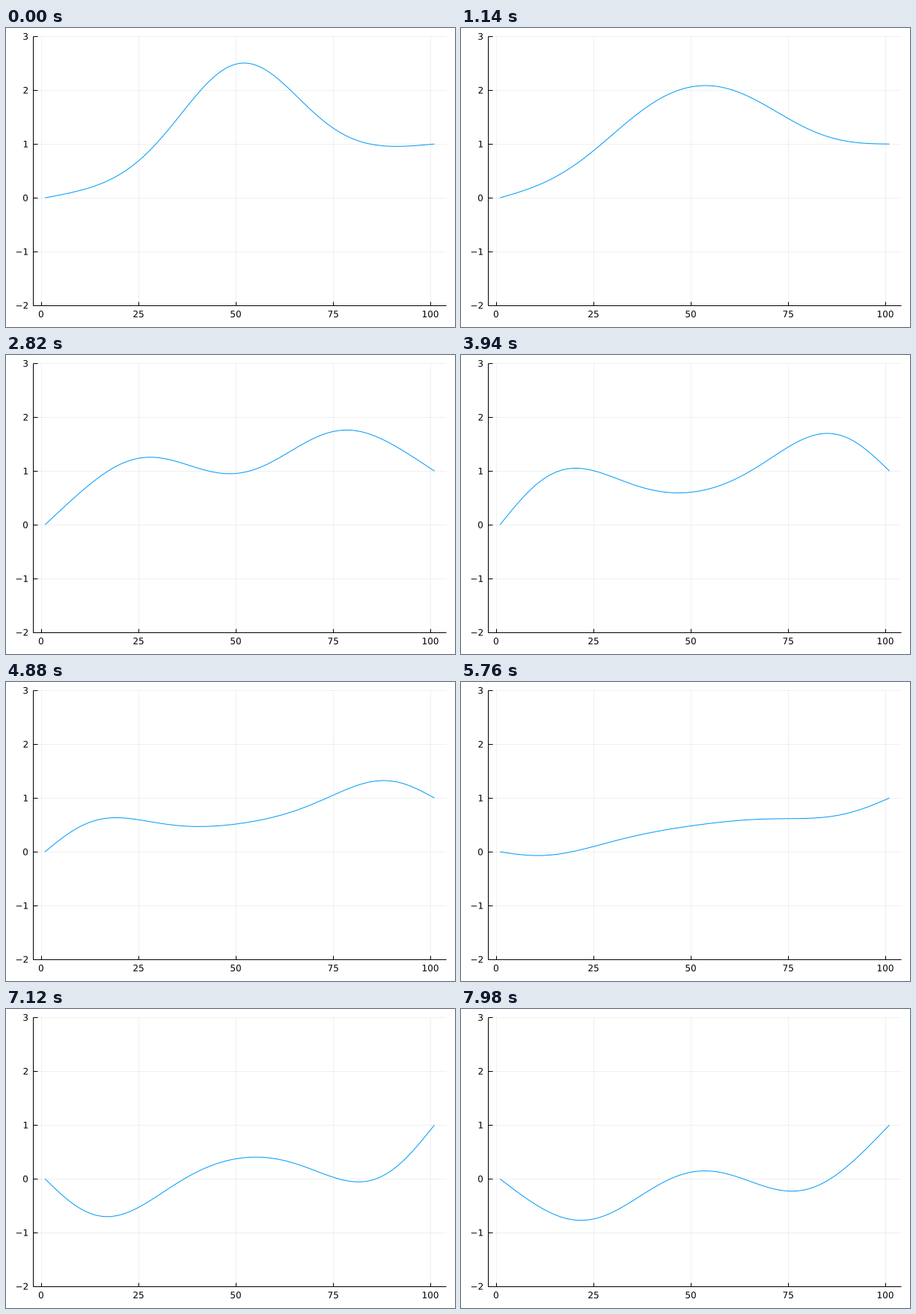
Recreate the animation shown at these times as a matplotlib script. Size 600x400 px, loop 8 s.

```python
import numpy as np
import matplotlib.pyplot as plt
from matplotlib.animation import FuncAnimation
from matplotlib.patches import PathPatch
from matplotlib.textpath import TextPath
from matplotlib.transforms import Affine2D

W, H, DPI = 600, 400, 100
LEFT, RIGHT, TOP, BOTTOM = 36.45, 588.1, 11.3, 371.1
XLIM, YLIM = (-2, 104), (-2, 3)
TICK_MS, TICKS = 20, 400
SPEED = 0.18 ** 0.5 / 100   # distance travelled per step, string length 1
WIDTH = 0.045               # 2 * sigma^2 of the initial bump
PX = 72 / DPI               # one pixel in points
FONT_PX = 12

plt.rcParams["font.family"] = "DejaVu Sans"


def to_x(v):
    return LEFT + (v - XLIM[0]) / (XLIM[1] - XLIM[0]) * (RIGHT - LEFT)


def to_y(v):
    return BOTTOM - (v - YLIM[0]) / (YLIM[1] - YLIM[0]) * (BOTTOM - TOP)


def bump(s):
    return np.exp(-(s - 0.5) ** 2 / WIDTH)


def odd_bump(s):
    """Bump extended with mirrored, sign-flipped copies at both fixed ends."""
    return sum(bump(s - 2 * k) - bump(-s - 2 * k) for k in (-1, 0, 1))


def string(step):
    """Plucked string between heights 0 and 1: two waves running apart."""
    d = SPEED * (step + 0.5)
    u = s + odd_bump(s - d) + odd_bump(s + d)
    u[0], u[-1] = 0, 1
    return u


def step_at(tick):
    """Three steps in every seven ticks: two quick ones, then a pause."""
    group, k = divmod(tick + 1, 7)
    return max(0, 3 * group - 2 + min(k, 2))


fig = plt.figure(figsize=(W / DPI, H / DPI), dpi=DPI, facecolor="white")
ax = fig.add_axes([0, 0, 1, 1])
ax.set_xlim(0, W)
ax.set_ylim(H, 0)
ax.axis("off")


def rule(xs, ys, **kw):
    ax.plot(xs, ys, color="black", lw=PX, snap=True,
            solid_capstyle="butt", **kw)


def label(x, y, value, align):
    """Number as an outline, so that it can sit between whole pixels.

    align: 0.5 centres the glyphs on x, 1 ends them at x.
    """
    path = TextPath((0, 0), str(value).replace("-", "\u2212"), size=FONT_PX)
    box = path.get_extents()
    shift = x - box.x0 - align * box.width
    place = Affine2D().scale(1, -1).translate(shift, y)
    ax.add_patch(PathPatch(place.transform_path(path), fc="black", lw=0))


for v in range(0, 101, 25):
    x = to_x(v)
    rule([x, x], [TOP, BOTTOM], alpha=0.06)
    rule([x, x], [BOTTOM, BOTTOM - 5])
    label(x, 387, v, 0.5)
for v in range(-2, 4):
    y = to_y(v)
    rule([LEFT, RIGHT], [y, y], alpha=0.06)
    rule([LEFT, LEFT + 6], [y, y])
    label(29, y + 4.4, v, 1)
rule([LEFT, LEFT], [TOP, BOTTOM])
rule([LEFT, RIGHT], [BOTTOM, BOTTOM])

s = np.linspace(0, 1, 101)
curve, = ax.plot(to_x(1 + 100 * s), to_y(string(0)), color="#009afa",
                 lw=PX, solid_capstyle="butt", zorder=5)


def update(tick):
    curve.set_ydata(to_y(string(step_at(tick))))
    return curve,


anim = FuncAnimation(fig, update, frames=TICKS, interval=TICK_MS,
                     blit=True, repeat=True, repeat_delay=0)
plt.show()
```
